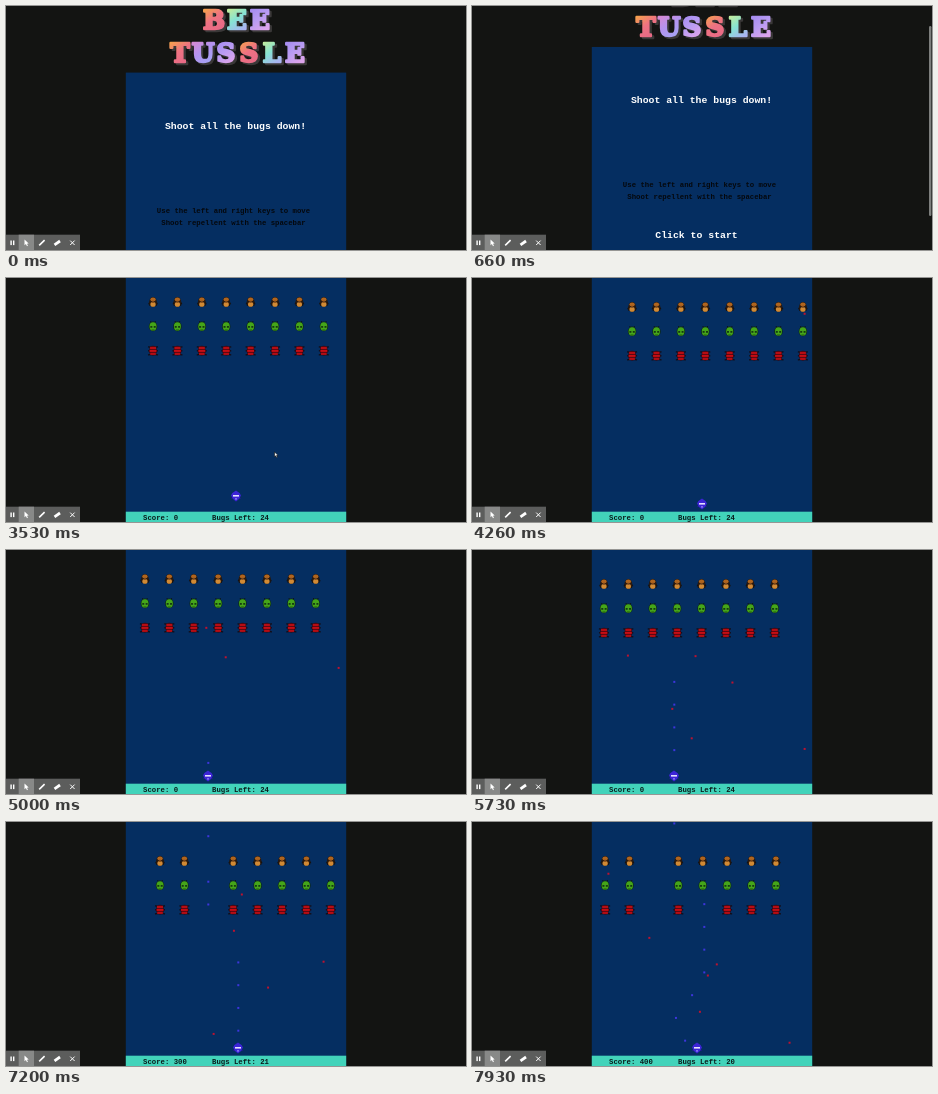
Recreate the animation shown at these times as an HTML page with a canvas. Size 460 by 244 pixels, loop 8 s.

```html
<!DOCTYPE html>
<html lang="en">
<head>
<meta charset="utf-8">
<title>Bee Tussle</title>
<style>
  html, body { margin: 0; width: 100%; height: 100%; overflow: hidden; background: #131412; }
  canvas { display: block; width: 460px; height: 244px; }
</style>
</head>
<body>
<canvas id="stage" width="460" height="244"></canvas>
<script>
const ctx = document.getElementById('stage').getContext('2d');
const LOOP = 8, START = 3.5;
const MONO = '"Liberation Mono", "Courier New", monospace';
const BLUE = '#052e61', TEAL = '#42d3ba', INK = '#0a1c1c';
const PITCH = 24.4, COLS = 8, ROWS = 3;
const SPEED = 111, FIRE_GAP = 0.205, BOMB_GAP = 0.27;

const SHIP_X = [[4.45, 230], [4.75, 202], [5.95, 202], [6.3, 232], [7.3, 232], [7.77, 195], [7.93, 225]];
const SHIP_Y = [[3.6, 218], [3.85, 226]];

const WARM = ['#f5a04e', '#ee7282', '#e86a86'];
const MINT = ['#c4ec9c', '#86e3d3', '#a9b4f2'];
const VIOLET = ['#a58cf0', '#b99cf3', '#dda4ec'];
const LILAC = ['#d58ad4', '#b393f0', '#a6a2f4'];

const random = n => {
  const v = Math.sin(n * 12.9898) * 43758.5453;
  return v - Math.floor(v);
};

function track(keys, t) {
  if (t <= keys[0][0]) return keys[0][1];
  for (let i = 1; i < keys.length; i++) {
    const [t0, a] = keys[i - 1], [t1, b] = keys[i];
    if (t < t1) return a + (b - a) * (t - t0) / (t1 - t0);
  }
  return keys[keys.length - 1][1];
}

// The swarm sweeps 39 px and drops 5 px at each edge.
function swarm(t) {
  const p = (t - 3.53) * 28.6 + 22, n = Math.floor(p / 39), d = p - n * 39;
  return { x: n % 2 ? 164 - d : 125 + d, y: 24 + 5 * n };
}

const bugs = Array.from({ length: COLS * ROWS }, (_, i) =>
  ({ col: i % COLS, row: Math.floor(i / COLS), end: Infinity }));

function bugAt(b, t) {
  const s = swarm(t);
  return { x: s.x + b.col * PITCH, y: s.y + b.row * PITCH };
}

const burst = (from, count) => Array.from({ length: count }, (_, i) => {
  const at = from + i * FIRE_GAP;
  return { at, x: track(SHIP_X, at), end: Infinity };
});
const shots = [...burst(4.883, 6), ...burst(6.43, 8)];
const shotY = (s, t) => 226 - (t - s.at) * SPEED;

// Fly every shot once to learn which bugs it takes out, and when.
for (let t = START; t < LOOP; t += 0.005) {
  for (const s of shots) {
    if (t < s.at || t >= s.end) continue;
    const hit = bugs.find(b => {
      const p = bugAt(b, t);
      return t < b.end && Math.abs(p.x - s.x) < 5.5 && Math.abs(p.y - shotY(s, t)) < 5;
    });
    if (hit) hit.end = s.end = t;
  }
}

const bombs = [];
for (let i = 0, at = 4.2; at < LOOP; i++, at += BOMB_GAP * (0.6 + 0.8 * random(i))) {
  const live = bugs.filter(b => at < b.end);
  bombs.push({ at, ...bugAt(live[Math.floor(random(i + 50) * live.length)], at) });
}

function rect(x, y, w, h, color) {
  ctx.fillStyle = color;
  ctx.fillRect(x, y, w, h);
}

function oval(x, y, rx, ry, color) {
  ctx.fillStyle = color;
  ctx.beginPath();
  ctx.ellipse(x, y, rx, ry, 0, 0, Math.PI * 2);
  ctx.fill();
}

function poly(pts, color) {
  ctx.fillStyle = color;
  ctx.beginPath();
  pts.forEach(([x, y]) => ctx.lineTo(x, y));
  ctx.closePath();
  ctx.fill();
}

function line(x0, y0, x1, y1, color, width) {
  ctx.strokeStyle = color;
  ctx.lineWidth = width;
  ctx.beginPath();
  ctx.moveTo(x0, y0);
  ctx.lineTo(x1, y1);
  ctx.stroke();
}

function label(str, x, y, size, color, align = 'center') {
  ctx.font = `bold ${size}px ${MONO}`;
  ctx.textAlign = align;
  ctx.textBaseline = 'middle';
  ctx.fillStyle = color;
  ctx.fillText(str, x, y);
}

function titleWord(word, x, base, tints) {
  ctx.font = 'bold 26px "DejaVu Serif", serif';
  ctx.textAlign = 'center';
  ctx.textBaseline = 'alphabetic';
  ctx.lineJoin = 'round';
  ctx.lineWidth = 2.4;
  const ink = (ch, cx, cy, style) => {
    ctx.fillStyle = ctx.strokeStyle = style;
    ctx.strokeText(ch, cx, cy);
    ctx.fillText(ch, cx, cy);
  };
  [...word].forEach((ch, i) => {
    const cx = x + i * 23;
    ink(ch, cx + 2.2, base + 2.2, '#3a3838');
    const g = ctx.createLinearGradient(cx - 8, base - 20, cx + 6, base);
    tints[i].forEach((c, k) => g.addColorStop(k / 2, c));
    ink(ch, cx, base, g);
  });
}

function intro(t) {
  const s = Math.min(69, 40.6 * Math.max(0, t - 0.03)), top = 66.6 - s;
  titleWord('BEE', 208, 23 - s, [WARM, MINT, VIOLET]);
  titleWord('TUSSLE', 174, 55.5 - s, [WARM, LILAC, VIOLET, WARM, MINT, VIOLET]);
  rect(119.8, top, 220.4, 320, BLUE);
  label('Shoot all the bugs down!', 229.5, top + 54, 9.8, '#fff');
  label('Use the left and right keys to move', 227.5, top + 138.4, 7.3, '#05080d');
  label('Shoot repellent with the spacebar', 227.5, top + 150.4, 7.3, '#05080d');
  label('Click to start', 224.5, top + 188.6, 9.8, '#fff');
  ctx.globalAlpha = Math.min(1, t / 0.06, Math.max(0, (2.8 - t) / 0.3));
  ctx.fillStyle = '#7d7f7d';
  ctx.beginPath();
  ctx.roundRect(457, s * 244 / 313, 2.4, 190, 1.2);
  ctx.fill();
  ctx.globalAlpha = 1;
}

function beetle(x, y) {
  for (const k of [-1, 1]) {
    line(x + k, y - 3, x + k * 4, y + 2.5, '#17110d', 2);
    line(x + k * 2, y + 1, x + k * 3.5, y + 4, '#17110d', 1);
  }
  oval(x, y, 3.8, 5, '#2a1a10');
  oval(x, y - 2.6, 2.7, 2, '#b0651f');
  oval(x, y + 2.4, 2.6, 2.4, '#d18a35');
  rect(x - 1, y - 1.2, 2, 2, '#7d4719');
}

function mite(x, y) {
  for (const k of [-1, 1]) line(x + k, y - 3, x + k * 2.5, y - 5.3, '#14100c', 0.9);
  oval(x, y, 4.2, 4.9, '#0d2a12');
  oval(x, y, 3.5, 4.2, '#45a51a');
  for (const k of [-1, 1]) rect(x + k * 1.7 - 1, y - 0.3, 2, 1.6, '#10300f');
  rect(x - 1.5, y + 2.6, 3, 0.8, '#2d7a14');
}

function crab(x, y) {
  for (const k of [-1, 1])
    for (const d of [-3.5, 0, 3.5]) line(x, y + d, x + k * 5, y + d * 1.15, '#150b12', 1.3);
  oval(x, y, 4, 5, '#3c0610');
  rect(x - 3, y - 4, 6, 2.4, '#b50d14');
  rect(x - 3.4, y - 0.9, 6.8, 2, '#c60d14');
  rect(x - 2.8, y + 1.9, 5.6, 2.2, '#b50d14');
}

function ship(x, y) {
  for (const k of [-1, 1]) line(x, y + 1, x + k * 4.6, y + 2.4, '#2a1699', 1.2);
  poly([[x, y - 5.5], [x + 3.6, y - 3], [x + 5, y - 0.5], [x + 3, y + 3],
    [x, y + 5.5], [x - 3, y + 3], [x - 5, y - 0.5], [x - 3.6, y - 3]], '#3c24d6');
  rect(x - 3, y - 1, 6, 1.6, '#e4dfff');
  rect(x - 0.9, y + 2.2, 1.8, 1.4, '#9a86f5');
}

function dot(x, y, color) {
  rect(x - 1, y - 1, 2, 2, color);
}

function game(t) {
  rect(119.8, 0, 220.4, 244, BLUE);
  for (const b of bugs) {
    const { x, y } = bugAt(b, t);
    if (t < b.end) [beetle, mite, crab][b.row](x, y);
  }
  for (const b of bombs) if (t >= b.at) dot(b.x, b.y + (t - b.at) * SPEED, '#bd1230');
  for (const s of shots) if (t >= s.at && t < s.end) dot(s.x + 0.3, shotY(s, t), '#3d35dc');
  ship(track(SHIP_X, t), track(SHIP_Y, t));
  rect(119.8, 233.7, 220.4, 10.3, TEAL);
  const dead = bugs.filter(b => t >= b.end).length;
  label('Score: ' + dead * 100, 137, 239.8, 7.3, INK, 'left');
  label('Bugs Left: ' + (bugs.length - dead), 206, 239.8, 7.3, INK, 'left');
}

function arrow(x, y, s, edge) {
  poly([[0, 0], [0, 6], [1.5, 4.8], [2.6, 7], [3.6, 6.5], [2.6, 4.4], [4.4, 4.2]]
    .map(([a, b]) => [x + a * s, y + b * s]), '#fff');
  if (!edge) return;
  ctx.strokeStyle = edge;
  ctx.lineWidth = 0.6;
  ctx.stroke();
}

function toolbar() {
  rect(0, 228.7, 74, 15.3, '#5c5d5c');
  rect(12.7, 228.7, 15.3, 15.3, '#888988');
  for (const x of [4.4, 7]) rect(x, 234.5, 1.4, 4.6, '#fff');
  arrow(18.5, 233.5, 0.95);
  line(33.2, 239.4, 38.6, 234.2, '#fff', 1.6);
  line(48.5, 238.8, 54, 235, '#fff', 2.8);
  for (const k of [-1, 1]) line(64.2, 236.8 - k * 2.2, 68.6, 236.8 + k * 2.2, '#fff', 1);
}

function draw() {
  const t = performance.now() / 1000 % LOOP;
  rect(0, 0, 460, 244, '#131412');
  if (t < START) intro(t); else game(t);
  if (t > 2.46 && t < 4.1) {
    const left = Math.max(0, 1 - (t - 2.46) / 0.64);
    arrow(268.5 + 32 * left, 174 - 24 * left, 0.8, '#111');
  }
  toolbar();
  requestAnimationFrame(draw);
}
draw();
</script>
</body>
</html>
```
